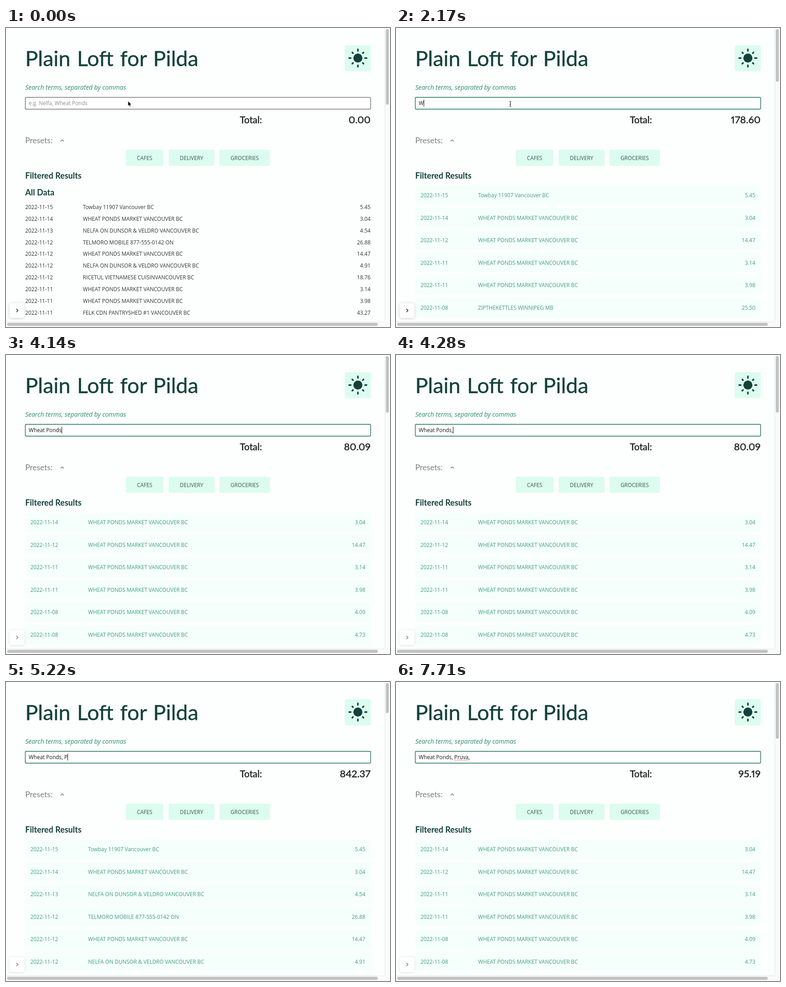
Recreate the animation shown at these times as an HTML page. Size 849 by 659 pixels, loop 8000 ms.

```html
<!DOCTYPE html>
<html lang="en">
<head>
<meta charset="utf-8">
<title>Plain Loft for Pilda</title>
<style>
  html, body { margin: 0; width: 100%; height: 100%; overflow: hidden; background: #fcfffe; }
  svg { display: block; width: 100vw; height: 100vh; }
  text { font: 11.75px "Open Sans", sans-serif; fill: #333; white-space: pre; }
  .lato { font-family: Lato, sans-serif; }
  .title { font-size: 47px; word-spacing: 2.5px; fill: #14423a; stroke: #14423a; stroke-width: .4px; }
  .head { font-size: 18.1px; font-weight: 700; fill: #14423a; }
  .label { font-size: 14px; font-style: italic; fill: #2b8a6e; }
  .total { font-size: 20.5px; font-weight: 500; fill: #1f2423; stroke: #1f2423; stroke-width: .35px; }
  .sum { font-size: 22px; font-variant-numeric: proportional-nums; }
  .presets { font-size: 17.5px; fill: #7b7f7e; }
  .hint { fill: #8d8d8d; }
  .typed { fill: #161616; }
  .button { text-anchor: middle; fill: #36574d; }
  .end { text-anchor: end; }
  .match text { fill: #419c82; }
  .mint { fill: #dcfcef; }
  .thumb { fill: #c1c1c1; }
  .float { fill: #fff; filter: drop-shadow(0 1px 3px rgba(0, 0, 0, var(--shade))); }
</style>
</head>
<body>
<svg id="stage" viewBox="0 0 849 659" preserveAspectRatio="none"></svg>
<script>
const LOOP = 8000;
const stage = document.getElementById('stage');

function add(parent, tag, attrs, content) {
  const el = document.createElementNS('http://www.w3.org/2000/svg', tag);
  for (const key in attrs) el.setAttribute(key, attrs[key]);
  if (content !== undefined) el.textContent = content;
  parent.append(el);
  return el;
}
const rect = (parent, x, y, width, height, rx, attrs) =>
  add(parent, 'rect', { x, y, width, height, rx, ...attrs });
const label = (parent, x, y, content, cls = '') =>
  add(parent, 'text', { x, y, class: cls }, content);
const stroke = (parent, d, color, width, attrs) =>
  add(parent, 'path', { d, fill: 'none', stroke: color, 'stroke-width': width, ...attrs });
const show = (el, on) => el.setAttribute('visibility', on ? 'visible' : 'hidden');

// Transactions: day in November, payee, amount
const shop = 'WHEAT PONDS MARKET VANCOUVER BC';
const cafe = 'NELFA ON DUNSOR & VELDRO VANCOUVER BC';
const all = [
  ['15', 'Towbay 11907 Vancouver BC', '5.45'],
  ['14', shop, '3.04'],
  ['13', cafe, '4.54'],
  ['12', 'TELMORO MOBILE 877-555-0142 ON', '26.88'],
  ['12', shop, '14.47'],
  ['12', cafe, '4.91'],
  ['12', 'RICETUL VIETNAMESE CUISINVANCOUVER BC', '18.76'],
  ['11', shop, '3.14'],
  ['11', shop, '3.98'],
  ['11', 'FELK CDN PANTRYSHED #1 VANCOUVER BC', '43.27']
];
const shopRows = all.filter(row => row[1] === shop);
const delivery = ['08', 'ZIPTHEKETTLES WINNIPEG MB', '25.50'];

function entry(parent, row, y, inset) {
  label(parent, 42.5 + inset, y, '2022-11-' + row[0]);
  label(parent, 170 + inset, y, row[1]);
  label(parent, 806 - inset, y, row[2], 'end');
}

function matchList(rows) {
  const group = add(stage, 'g', { class: 'match' });
  for (let i = 0; i < 7; i++) {
    const y = 348 + i * 49.45;
    rect(group, 42.5, y, 764, 42, 3, { fill: '#f5fffb' });
    if (rows[i]) entry(group, rows[i], y + 25.3, 11.5);
  }
  return group;
}

// Header
rect(stage, 0, 0, 849, 659, 0, { fill: '#fcfffe' });
label(stage, 42.5, 84, 'Plain Loft for Pilda', 'lato title');
rect(stage, 749, 38, 57.5, 57.5, 4, { class: 'mint' });
add(stage, 'circle', { cx: 778, cy: 66.3, r: 10, fill: '#14423a' });
for (let i = 0; i < 8; i++) {
  const [from, to] = i % 2 ? [15.2, 17.6] : [15.8, 19.3];
  stroke(stage, `M${from} 0H${to}`, '#14423a', 3.4, {
    'stroke-linecap': 'round',
    transform: `translate(778 66.3) rotate(${i * 45})`
  });
}

// Search field
label(stage, 42.5, 135.6, 'Search terms, separated by commas', 'label');
const field = rect(stage, 42.6, 152.8, 763.6, 26, 2, { fill: '#fff' });
const hint = label(stage, 50.3, 169.8, 'e.g. Nelfa, Wheat Ponds', 'hint');
const typed = label(stage, 50.3, 169.8, '', 'typed');
const squiggle = stroke(stage, '', '#d8434b', 1.5, {
  'stroke-dasharray': '0 2.4', 'stroke-linecap': 'round'
});
const caret = rect(stage, 0, 158, 1, 15, 0, { fill: '#000' });
const arrow = add(stage, 'path', {
  d: 'M269.8 161v11l2.5-2.3 1.7 3.8 1.8-.8-1.7-3.7h3.5z',
  fill: '#000', stroke: '#fff', 'stroke-width': .7
});
const beam = stroke(stage, 'M250.6 161.5q2 0 2 1.5v8.5q0 1.5-2 1.5M254.6 161.5q-2 0-2 1.5v8.5q0 1.5 2 1.5M251.4 168.6h2.4', '#222', 1);

// Total and presets
label(stage, 517, 210, 'Total:', 'lato total');
const sum = label(stage, 806, 210, '', 'lato total sum end');
label(stage, 42.5, 254, 'Presets:', 'lato presets');
stroke(stage, 'M120.8 250l3.6-3.6 3.6 3.6', '#737776', 1.4);
for (const [x, width, name] of [[265, 83, 'CAFES'], [359.5, 101.5, 'DELIVERY'], [472, 111.5, 'GROCERIES']]) {
  rect(stage, x, 268.3, width, 35.5, 3, { class: 'mint' });
  label(stage, x + width / 2, 290.6, name, 'button');
}
label(stage, 42.5, 332.2, 'Filtered Results', 'lato head');

// Result lists
const full = add(stage, 'g');
label(full, 42.5, 369, 'All Data', 'lato head');
all.forEach((row, i) => entry(full, row, 398.9 + i * 25.87, 0));
const lists = {
  none: full,
  w: matchList([all[0], ...shopRows, delivery]),
  shop: matchList([...shopRows, ['08', shop, '4.09'], ['08', shop, '4.73']]),
  broad: matchList(all)
};

// Side toggle and scrollbars
const toggle = rect(stage, 8, 606.5, 32.5, 32.5, 5, { class: 'float' });
const chevron = stroke(stage, 'M23 619l3.5 3.6-3.5 3.6', '#222', 1.5);
rect(stage, 837, 0, 12, 659, 0, { fill: '#fafafa' });
rect(stage, 0, 647, 849, 12, 0, { fill: '#fafafa' });
stroke(stage, 'M837.5 0V647M0 647.5H837', '#e8e8e8', 1);
rect(stage, 2.5, 649.8, 819.5, 6.6, 3.3, { class: 'thumb' });
const thumb = rect(stage, 839.8, 2.5, 6.6, 166.5, 3.3, { class: 'thumb' });

// Typing: time, text, list, total, lower end of the scroll thumb
const typing = [
  [0, '', 'none', '0.00', 169],
  [2170, 'W', 'w', '178.60', 118.5],
  [2270, 'Wh', 'shop', '80.09', 127],
  [2350, 'Whe'],
  [2520, 'Whea'],
  [2610, 'Wheat '],
  [2700, 'Wheat P'],
  [2900, 'Wheat Pon'],
  [3040, 'Wheat Pond'],
  [3150, 'Wheat Ponds'],
  [4210, 'Wheat Ponds,'],
  [4370, 'Wheat Ponds, '],
  [5220, 'Wheat Ponds, P', 'broad', '842.37', 68.5],
  [5670, 'Wheat Ponds, Pru', 'shop', '95.19', 125],
  [5810, 'Wheat Ponds, Pruv'],
  [5920, 'Wheat Ponds, Pruva'],
  [7120, 'Wheat Ponds, Pruva,'],
  [7240, 'Wheat Ponds, Pruva, ']
];
// Unset columns carry over from the step before
typing.forEach((step, i) => {
  for (let col = 2; col < 5; col++) step[col] ??= typing[i - 1][col];
});
const caretFlips = [1150, 1630, 2170, 3650, 4140, 4870, 5220, 6420, 6970, 7710];

const ramp = (t, from, to) => Math.min(1, Math.max(0, (t - from) / (to - from)));
const mix = (a, b, k) => `rgb(${a.map((v, i) => Math.round(v + (b[i] - v) * k))})`;
let current;

function setStep(step) {
  if (step === current) return;
  current = step;
  const [, text, list, total, thumbEnd] = step;
  typed.textContent = text;
  sum.textContent = total;
  show(hint, !text);
  for (const name in lists) show(lists[name], name === list);
  thumb.setAttribute('height', thumbEnd - 2.5);
  caret.setAttribute('x', 50.3 + (text ? typed.getComputedTextLength() : 0));
  const start = text.indexOf('Pruva');
  if (start > 0) {
    const x = 50.3 + typed.getSubStringLength(0, start);
    squiggle.setAttribute('d', `M${x + 1} 172.2h${typed.getSubStringLength(start, 5) - 1}`);
  }
}

function render(t) {
  setStep(typing.findLast(step => step[0] <= t));
  show(caret, caretFlips.filter(at => at <= t).length % 2);
  show(squiggle, t >= 6970);
  show(arrow, t < 70);
  show(beam, t >= 70 && t < 3350);
  const focus = ramp(t, 900, 1150);
  field.setAttribute('stroke', mix([92, 92, 92], [28, 108, 84], focus));
  field.setAttribute('stroke-width', 1.2 + .2 * focus);
  const fade = ramp(t, 3900, 4140);
  chevron.setAttribute('stroke', mix([34, 34, 34], [125, 125, 125], fade));
  toggle.style.setProperty('--shade', .2 - .09 * fade);
}

const begin = performance.now();
function tick() {
  render((performance.now() - begin) % LOOP);
  requestAnimationFrame(tick);
}
tick();
</script>
</body>
</html>
```
